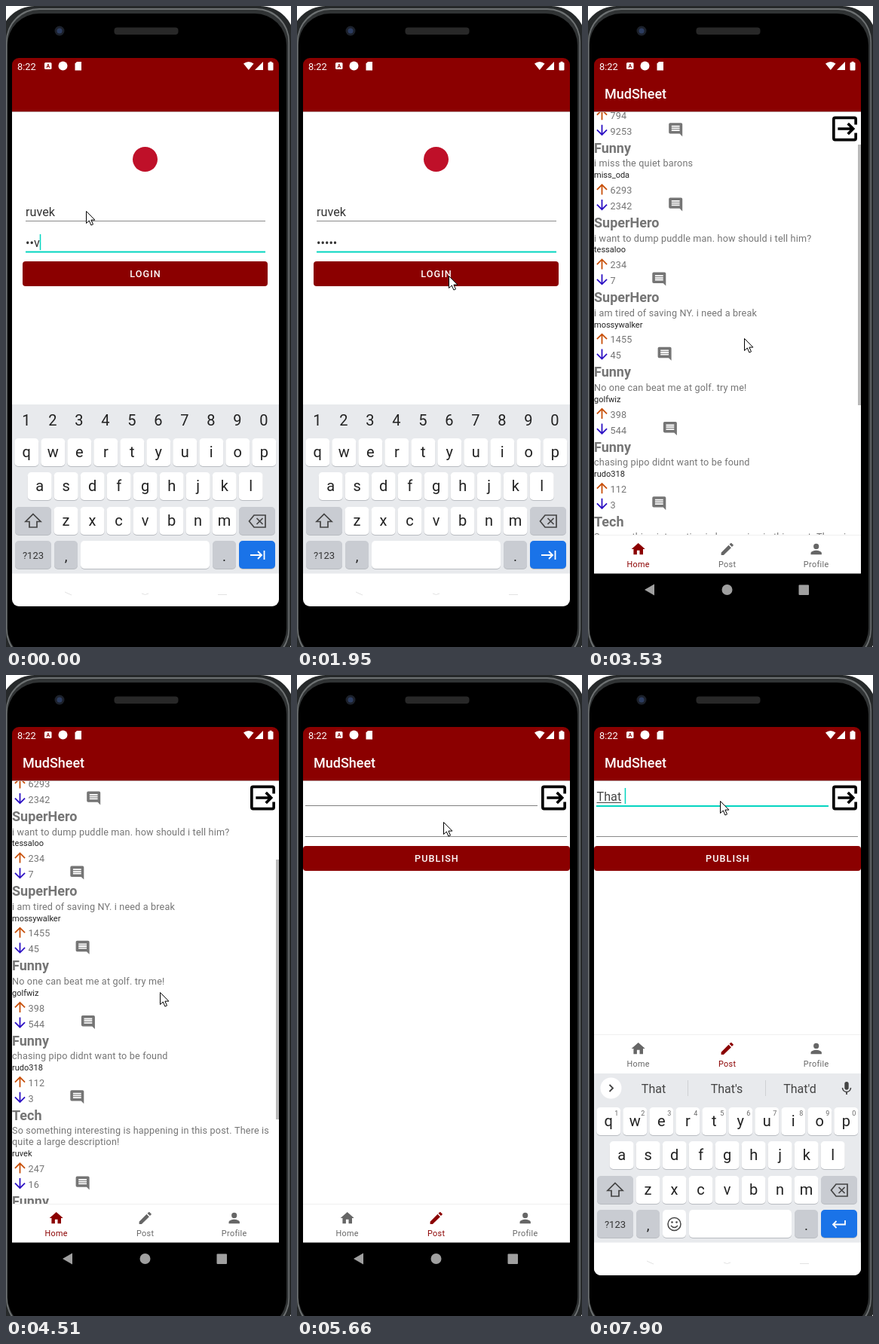
Recreate the animation shown at these times as an HTML page with a canvas. Size 378 by 851 pixels, loop 8 s.

```html
<!DOCTYPE html>
<html lang="en">
<head>
<meta charset="utf-8">
<title>Phone demo</title>
<style>
html, body { margin: 0; height: 100%; overflow: hidden; background: #fff; }
canvas { display: block; }
</style>
</head>
<body>
<canvas id="stage" width="378" height="851"></canvas>
<script>
const c = document.getElementById('stage').getContext('2d');
const LOOP = 8000, RED = '#8b0000', TEAL = '#03d5c0', GREY = '#757575', INK = '#222';

const bursts = [[0, 0, 1], [120, 270, 2], [700, 1240, 5], [1670, 1950, 3], [2250, 3260, 8], [3400, 4360, 8],
  [4510, 5520, 8], [5660, 6450, 7], [7050, 7050, 1], [7500, 7900, 3]];
const steps = bursts.flatMap(([a, b, n]) =>
  Array.from({ length: n }, (_, i) => Math.floor((a + (b - a) * i / Math.max(1, n - 1)) / 10) * 10));

const mousePath = [[0, 106, 272], [560, 106, 272], [700, 130, 235], [840, 160, 200], [970, 215, 270], [1110, 233, 372],
  [1240, 201, 358], [2850, 201, 358], [3260, 208, 500], [3400, 208, 506], [3530, 207, 441], [3810, 205, 341],
  [3940, 205, 341], [4510, 204, 421], [4800, 190, 690], [4940, 185, 718], [5080, 185, 718], [5520, 194, 250],
  [5660, 194, 195], [5920, 175, 167]];
const scrollPath = [[3400, 0], [3530, 65], [3810, 165]];
const keyboardPath = [[5920, 268], [6050, 200], [6180, 60], [6310, 0]];

const posts = [
  ['Tech', ['i really want that new purple quillo 12. jeez'], 'sunMoth', 794, 9253],
  ['Funny', ['i miss the quiet barons'], 'miss_oda', 6293, 2342],
  ['SuperHero', ['i want to dump puddle man. how should i tell him?'], 'tessaloo', 234, 7],
  ['SuperHero', ['i am tired of saving NY. i need a break'], 'mossywalker', 1455, 45],
  ['Funny', ['No one can beat me at golf. try me!'], 'golfwiz', 398, 544],
  ['Funny', ['chasing pipo didnt want to be found'], 'rudo318', 112, 3],
  ['Tech', ['So something interesting is happening in this post. There is', 'quite a large description!'], 'ruvek', 247, 16],
  ['Funny', ['my cat runs this house now'], 'tessaloo', 88, 12]
];

const icons = {
  Home: 'M10 20v-6h4v6h5v-8h3L12 3 2 12h3v8z',
  Post: 'M3 17.3V21h3.7L17.8 10 14 6.2zM20.7 7q.8-.7 0-1.4l-2.3-2.3q-.7-.7-1.4 0L15.1 5l3.8 3.8z',
  Profile: 'M12 12a4 4 0 1 0 0-8 4 4 0 0 0 0 8zM12 14c-2.7 0-8 1.3-8 4v2h16v-2c0-2.7-5.3-4-8-4z',
  comment: 'M22 4q0-2-2-2H4q-2 0-2 2v12q0 2 2 2h14l4 4zM6 6h12v2H6zM6 9h12v2H6zM6 12h12v2H6z',
  up: 'M4 12l1.4 1.4L11 7.8V20h2V7.8l5.6 5.6L20 12 12 4z',
  down: 'M20 12l-1.4-1.4L13 16.2V4h-2v12.2l-5.6-5.6L4 12l8 8z',
  exit: 'M21 9V5q0-2-2-2H5q-2 0-2 2v14q0 2 2 2h14q2 0 2-2v-4h-2v4H5V5h14v4zM15 7.5l-1.4 1.4 2.1 2.1H7v2h8.7l-2.1 2.1L15 16.5l4.500-4.500z',
  mic: 'M12 14a3 3 0 0 0 3-3V5a3 3 0 0 0-6 0v6a3 3 0 0 0 3 3zM17.3 11a5.3 5.3 0 0 1-10.6 0H5q.3 5.5 6 6.7V21h2v-3.3q5.7-1.2 6-6.7z'
};

// Piecewise linear value of a path of [time, ...values]
function at(path, t) {
  const i = path.findIndex(p => p[0] > t);
  if (i < 0) return path.at(-1).slice(1);
  if (i === 0) return path[0].slice(1);
  const a = path[i - 1], b = path[i], k = (t - a[0]) / (b[0] - a[0]);
  return a.slice(1).map((v, j) => v + (b[j + 1] - v) * k);
}

function rect(x, y, w, h, color, r = 0) {
  c.fillStyle = color;
  c.beginPath();
  c.roundRect(x, y, w, h, r);
  c.fill();
}

function disc(x, y, r, color) {
  c.fillStyle = color;
  c.beginPath();
  c.arc(x, y, r, 0, 7);
  c.fill();
}

function text(s, x, y, size, color, { weight = 400, align = 'left', space = 0 } = {}) {
  c.font = `${weight} ${size}px Roboto, sans-serif`;
  c.letterSpacing = space + 'px';
  c.textAlign = align;
  c.fillStyle = color;
  c.fillText(s, x, y);
}

const mid = (s, x, y, size, color) => text(s, x, y, size, color, { align: 'center' });
const small = (s, x, y) => text(s, x, y, 12.6, GREY, { space: .18 });

function line(d, color, width = 1.7) {
  c.strokeStyle = color;
  c.lineWidth = width;
  c.stroke(new Path2D(d));
}

function shape(d, color) {
  c.fillStyle = color;
  c.fill(new Path2D(d), 'evenodd');
}

function icon(name, x, y, color, scale = .9) {
  c.save();
  c.translate(x, y);
  c.scale(scale, scale);
  c.translate(-12, -12);
  shape(icons[name], color);
  c.restore();
}

function body() {
  rect(0, 0, 378, 851, '#fff');
  rect(-8, 0, 391, 874, '#26292a', 46);
  rect(0, 3, 376, 869, '#6d7172', 44);
  rect(1.5, 5, 373, 865, '#303334', 43);
  rect(2, 10, 370, 858, '#000', 42);
  disc(71, 33, 6.5, '#1c212b');
  disc(71, 33, 3.5, '#2c3c60');
  rect(143.5, 28.5, 85, 9.5, '#282828', 4);
}

function statusBar() {
  rect(8, 69, 354, 71, RED);
  rect(8, 140, 354, 1, '#b9a5a5');
  text('8:22', 15, 84.5, 12.8, '#fff');
  rect(51, 75, 9.5, 9, '#fff', 1.5);
  text('A', 55.8, 82.3, 7, RED, { weight: 700, align: 'center' });
  disc(75.5, 79.5, 6, '#fff');
  shape('M94 74h6v11.5h-8.500v-9z', '#fff');
  shape('M315 76.5q6.800-5 13.500 0l-6.700 8.500z', '#fff');
  shape('M341 74v11h-11z', '#fff');
  rect(347.5, 75, 7, 10.5, '#fff', 1);
  rect(349.5, 73.7, 3, 2, '#fff');
}

function appBar() {
  statusBar();
  text('MudSheet', 22, 123, 18, '#fff', { weight: 500 });
}

function button(label, x, y, w) {
  rect(x, y, w, 33, RED, 4);
  text(label, x + w / 2 + .5, y + 21.3, 12.6, '#fff', { weight: 500, align: 'center', space: 1.1 });
}

const page = () => rect(8, 140, 354, 613.5, '#fff');

function systemNav(light) {
  rect(8, 753.5, 354, 43.5, light ? '#fff' : '#000');
  if (light) return line('M78 778l9 4M180 780q4.500 3 9 0M281 781.500h12', '#e2e2e2', 1);
  shape('M75 775l13-7.500v15z', '#a0a0a0');
  disc(184.5, 775, 7, '#a0a0a0');
  rect(279.5, 768.5, 13.5, 13.5, '#a0a0a0', 1);
}

function tabs(active, y) {
  rect(8, y - 1, 354, 1, '#f0f0f0');
  rect(8, y, 354, 51, '#fff');
  ['Home', 'Post', 'Profile'].forEach((name, i) => {
    const x = 66.7 + 118 * i, color = name === active ? RED : '#666';
    icon(name, x, y + 18, color);
    text(name, x, y + 41.5, 10.8, color, { align: 'center', space: .36 });
  });
}

function key(x, y, w, color = '#fff') {
  rect(x, y + 1, w, 37, '#b9bcc1', 5);
  rect(x, y, w, 37, color, 5);
}

function letters(row, x, y, hints) {
  [...row].forEach((s, i) => {
    const cx = x + 35 * i;
    key(cx - 16, y, 32);
    mid(s, cx, y + 24.5, 20, INK);
    if (hints) mid((i + 1) % 10, cx + 10.5, y + 10.5, 9, '#666');
  });
}

// words: suggestion strip with a text keyboard; without them the number row
function keyboard(words) {
  const dark = '#c9ccd2';
  rect(8, 529, 354, 225, '#e8eaed');
  if (words) {
    disc(30.5, 548.5, 14, '#fff');
    line('M28.5 544l4.500 4.500-4.500 4.500', '#444', 1.8);
    words.forEach((w, i) => mid(w, 87 + 97 * i, 555, 16, '#444'));
    rect(132, 538, 1, 21, '#cfd1d4');
    rect(235, 538, 1, 21, '#cfd1d4');
    icon('mic', 343, 549, '#444');
  } else {
    [...'1234567890'].forEach((n, i) => mid(n, 26.8 + 35 * i, 556.5, 20, INK));
  }
  letters('qwertyuiop', 27.3, 574, words);
  letters('asdfghjkl', 44.7, 619);
  letters('zxcvbnm', 79.5, 665);
  key(12, 665, 48, dark);
  line('M36 674.5l10 10h-5v7.500h-10v-7.500h-5z', '#444');
  key(309, 665, 48, dark);
  line('M329 676h15v16h-15l-6.500-8zM332.5 680l8 8M340.5 680l-8 8', '#444');
  key(12, 710, 48, dark);
  mid('?123', 36, 734, 13, '#333');
  key(64, 710, 31, dark);
  mid(',', 79.5, 737, 19, INK);
  key(274, 710, 31, dark);
  mid('.', 289.5, 737, 19, INK);
  key(309, 710, 48, '#1a73e8');
  if (words) {
    key(99, 710, 31);
    key(134, 710, 136);
    line('M123 729a8.5 8.5 0 1 0-17 0a8.5 8.5 0 1 0 17 0M110 731q4.500 5 9 0', '#444', 1.5);
    disc(111.5, 726.5, 1.3, '#444');
    disc(117.5, 726.5, 1.3, '#444');
    line('M341 724v5.5h-16M329.5 725l-4.500 4.500 4.500 4.500', '#fff', 1.8);
  } else {
    key(99, 710, 171);
    line('M324 729h15M334 724l5 5-5 5M342.5 723v12', '#fff', 1.8);
  }
}

function login(t) {
  const open = t < 2250;
  page();
  statusBar();
  disc(184.5, 203.5, 16.5, '#bf1029');
  text('ruvek', 26, 279, 16.2, '#333');
  rect(26, 285, 318, 1, '#8a8a8a');
  const pass = t < 120 ? '••v' : t < 270 ? '•••e' : t < 1670 ? '••••k' : '•••••';
  text(pass, 26, 319.5, 16.2, '#333');
  const end = 26 + c.measureText(pass).width;
  if (t < 830 || t >= 1240 && t < 1950) rect(end, 303, 1.5, 21, TEAL);
  rect(26, 325.5, 318, 2, TEAL);
  button('LOGIN', 22, 339, 325);
  if (t >= 1670 && t < 1950) {
    c.save();
    c.beginPath();
    c.roundRect(22, 339, 325, 33, 4);
    c.clip();
    disc(201, 358, t < 1800 ? 70 : 190, 'rgba(255,255,255,.2)');
    c.restore();
  }
  if (open) keyboard();
  systemNav(open);
}

function post([topic, lines, user, up, down], y) {
  text(topic, 8, y, 18, GREY, { weight: 700 });
  lines.forEach((s, i) => small(s, 8, y + 18.7 + 15 * i));
  y += 15 * (lines.length - 1);
  text(user, 8, y + 33.5, 11, INK);
  icon('up', 18.5, y + 48.5, '#c8500a');
  icon('down', 18.5, y + 69.5, '#2c10c4');
  small(up, 29.5, y + 54.2);
  small(down, 29.5, y + 75.2);
  icon('comment', 87 + 7.3 * String(down).length, y + 68.7, GREY);
  return y + 99.2;
}

function exitIcon() {
  rect(322, 141, 40, 43, '#fff');
  icon('exit', 340.5, 163, '#000', 1.83);
}

function feed(t) {
  const [scroll] = at(scrollPath, t);
  page();
  c.save();
  c.beginPath();
  c.rect(8, 140, 354, 563);
  c.clip();
  let y = 160.5 - scroll;
  for (const p of posts) y = post(p, y);
  if (t < 2900 || t > 3500 && t < 4900) {
    const top = 141 + .63 * scroll;
    rect(358, top, 4, 491 + .6 * scroll - top, '#b8b8b8');
  }
  c.restore();
  exitIcon();
  appBar();
  tabs('Home', 703);
  systemNav(false);
}

function compose(t) {
  const focus = t >= 5920, raised = t >= 6180;
  const typed = t < 7500 ? '' : t < 7700 ? 'Th' : t < 7900 ? 'That' : 'That ';
  page();
  exitIcon();
  appBar();
  text(typed, 11.5, 167, 16.2, '#444');
  const end = 11.5 + c.measureText(typed).width;
  if (typed) rect(11.5, 169, c.measureText(typed.trim()).width, 1, '#444');
  if (focus && (t < 7050 || typed)) rect(end + .5, 150, 1.5, 21, TEAL);
  rect(11, 173, 308, focus ? 2 : 1, focus ? TEAL : '#808080');
  rect(11, 214, 347, 1, '#8a8a8a');
  button('PUBLISH', 8, 227, 354);
  tabs('Post', raised ? 478 : 703);
  systemNav(focus);
  if (!focus) return;
  const [drop] = at(keyboardPath, t);
  c.save();
  c.translate(0, drop);
  keyboard(!typed ? ['I', 'The', "I'm"] : typed === 'Th' ? ['This', 'The', 'That'] : ['That', "That's", "That'd"]);
  c.restore();
  if (drop < 100) systemNav(true);
}

function openFeed(t) {
  const early = t < 2390, scale = early ? .93 : t < 2530 ? .998 : 1;
  if (scale < 1) login(t);
  c.save();
  c.translate(185, 433);
  c.scale(scale, scale);
  c.translate(-185, -433);
  c.globalAlpha = early ? .6 : 1;
  feed(t);
  c.restore();
}

function mouse(t) {
  const [x, y] = at(mousePath, t);
  c.save();
  c.translate(x + .5, y + .5);
  const arrow = 'M0 0v16l3.8-3.500 2.600 6 2.600-1.100-2.600-5.800h5z';
  shape(arrow, '#fff');
  line(arrow, '#000', 1);
  c.restore();
}

function draw(now) {
  const time = now % LOOP, t = steps.findLast(s => s <= time);
  body();
  c.save();
  c.beginPath();
  c.roundRect(8, 69, 354, 728, 9);
  c.clip();
  if (t < 2250) login(t);
  else if (t < 5080) openFeed(t);
  else compose(t);
  c.restore();
  mouse(t);
}

function frame() {
  draw(performance.now());
  requestAnimationFrame(frame);
}
frame();
</script>
</body>
</html>
```
